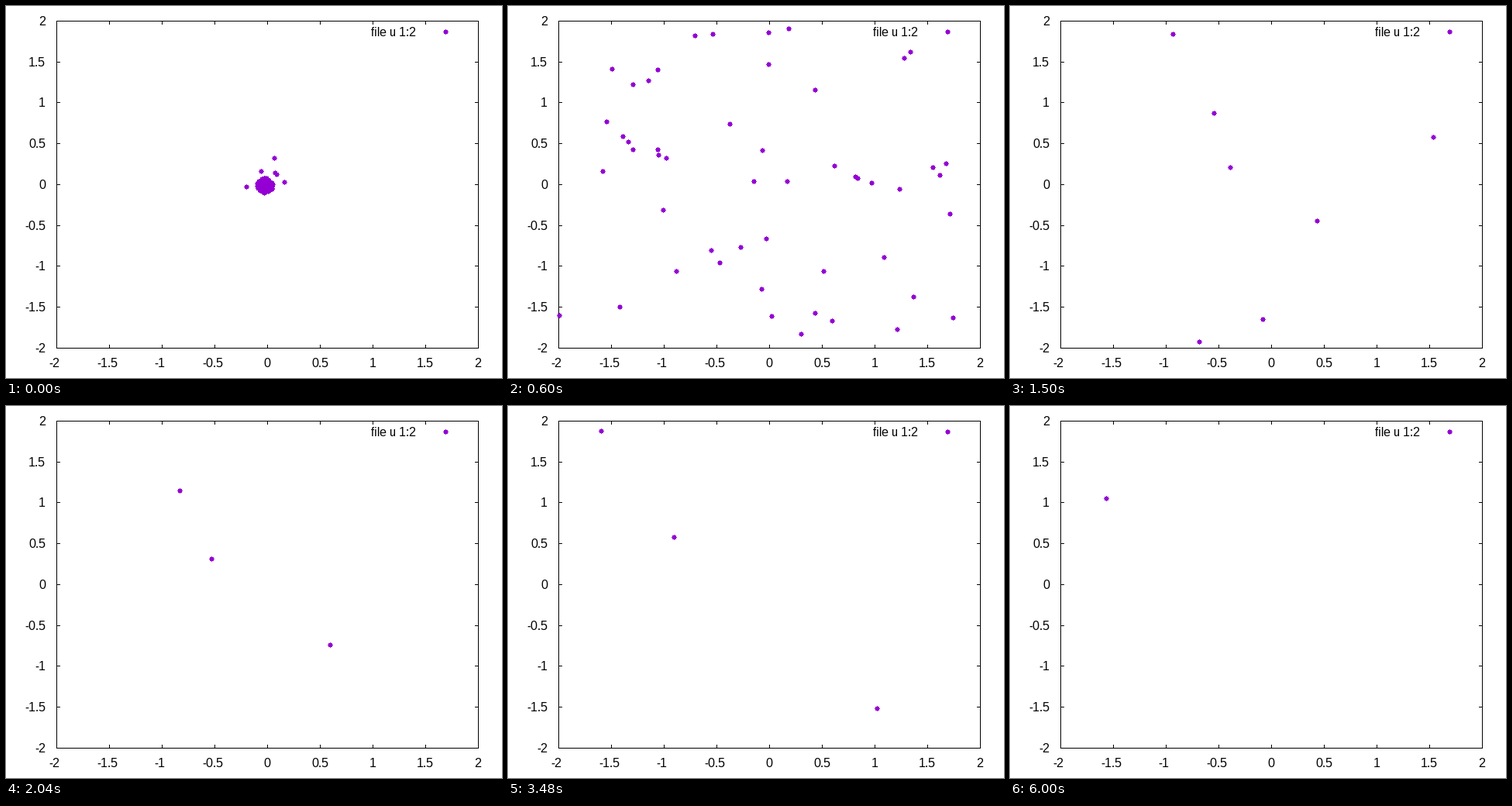
These frames come from a looping animation (640 px wide and 480 px high, 6.06 s). A matplotlib script:

```python
import math

import matplotlib.pyplot as plt
import numpy as np
from matplotlib.animation import FuncAnimation
from matplotlib.collections import PolyCollection
from matplotlib.patches import Rectangle

plt.rcParams["text.hinting"] = "default"
plt.rcParams["text.hinting_factor"] = 1

W, H, DPI = 640, 480, 100
FRAMES, STEP = 101, 60
LEFT, RIGHT, TOP, BOTTOM = 65, 609, 19, 441
CENTER = np.array([337.0, 230.0])
VIOLET = "#9400d3"
COUNT = 97       # dots that soon fly out of the plot
SPREAD = 22      # their typical speed in pixels per step
SETTLE = 10      # steps until the starting scatter has faded
CLEARED = 33     # step by which they have all left

# Lasting dots: start, velocity and place at step 34.
LASTING = np.array([
    (347, 215, -4.333, -3.208, 224, 109),
    (336, 232, -2.144, -1.183, 265.1, 197.45),
    (346, 196, 2.417, 3.417, 418, 308),
])


def inside(p):
    x, y = p[:, 0], p[:, 1]
    return (x >= LEFT) & (x <= RIGHT) & (y >= TOP) & (y <= BOTTOM)


def burst():
    """Return start, line origin and velocity of every dot."""
    rng = np.random.default_rng(4)
    speed = rng.normal(0, SPREAD, (4 * COUNT, 2))
    speed = speed[~inside(CENTER + speed * CLEARED)][:COUNT]
    angle = rng.uniform(0, 2 * math.pi, COUNT)
    radius = 10 * np.sqrt(rng.uniform(0, 1, COUNT))
    clump = np.column_stack([np.cos(angle), np.sin(angle)]) * radius[:, None]
    clump += (334, 231)
    clump[:4] = (310, 233), (359, 227), (329, 213), (349, 217)
    origin = np.tile(CENTER, (COUNT, 1))
    start, drift, later = np.split(LASTING, 3, axis=1)
    return (np.vstack([clump, start]),
            np.vstack([origin, later - 34 * drift]),
            np.vstack([speed, drift]))


start, origin, velocity = burst()


def dots_at(step):
    fade = max(0, 1 - step / SETTLE)
    p = origin + velocity * step + (start - origin) * fade
    return np.floor(p[inside(p)] + 0.5)


# A 5 by 5 pixel block with a one-pixel tip on each side.
SIDE = [(-2.5, -2.5), (-0.5, -2.5), (-0.5, -3.5), (0.5, -3.5), (0.5, -2.5)]
DOT = np.array([((x, y), (-y, x), (-x, -y), (y, -x))[turn]
                for turn in range(4) for x, y in SIDE])


def outlines(points):
    return [DOT + p + 0.5 for p in points]


fig = plt.figure(figsize=(W / DPI, H / DPI), dpi=DPI, facecolor="white")
ax = fig.add_axes([0, 0, 1, 1])
ax.set_xlim(0, W)
ax.set_ylim(H, 0)
ax.axis("off")


def bar(x, y, w, h):
    ax.add_patch(Rectangle((x, y), w, h, fc="black", lw=0, antialiased=False))


def label(x, y, text, ha):
    ax.text(x, y, text, ha=ha, va="baseline", family="Liberation Sans",
            fontsize=16 * 72 / DPI, color="black")


for y in (TOP, BOTTOM):
    bar(LEFT, y, RIGHT - LEFT + 1, 1)
for x in (LEFT, RIGHT):
    bar(x, TOP, 1, BOTTOM - TOP + 1)

for k in range(9):
    value = -2 + k / 2
    text = f"{value:g}"
    x = LEFT + 68 * k
    y = BOTTOM - math.floor(52.75 * k + 0.5)
    bar(x, TOP, 1, 5)
    bar(x, BOTTOM - 4, 1, 5)
    bar(LEFT, y, 5, 1)
    bar(RIGHT - 4, y, 5, 1)
    label(x if value >= 0 else x - 2.5, 466, text, "center")
    label(51, y + 6, text, "right")

label(471, 39, "file u 1:2", "left")

key = [np.array([567.0, 33.0])]
dots = PolyCollection(outlines(key), facecolors=VIOLET, linewidths=0,
                      antialiaseds=False, zorder=3)
ax.add_collection(dots, autolim=False)


def draw(step):
    dots.set_verts(outlines(key + list(dots_at(step))))
    return (dots,)


anim = FuncAnimation(fig, draw, frames=FRAMES, interval=STEP, repeat=True,
                     repeat_delay=0, blit=False)
plt.show()
```
